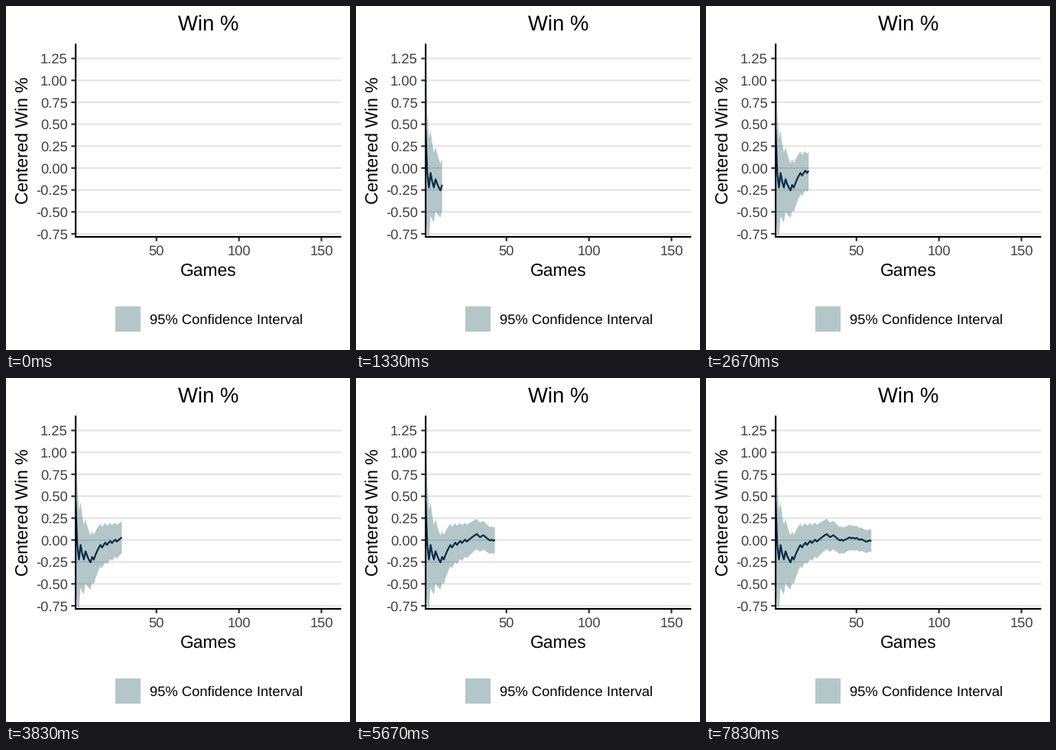
A matplotlib script for the animation above (8 s loop, 450 by 450 pixels).

```python
import numpy as np
import matplotlib.pyplot as plt
from matplotlib.animation import FuncAnimation
from matplotlib.patches import Polygon, Rectangle

plt.rcParams["font.family"] = "Liberation Sans"
plt.rcParams["path.snap"] = False
plt.rcParams["text.hinting"] = "none"

SIZE, DPI = 450, 100
LOOP, TICK = 8000, 20
STEP_MS = LOOP / 48
GAMES_PER_STEP = 161 / 130
LEFT, RIGHT = 91.1, 438.5
PX = 72 / DPI
BASE = 22.92
LINE = 2.2 * PX
TEAL, NAVY, GREY = "#08484A", "#062A48", "#404040"

RESULTS = ("WLLWLLWLLL" "WLWWWWLWWL" "WWLWWLWWWW"
           "WWLLWWLLLL" "WLWWWWLWLW" "LLWLLLWWL")
SEASON_PCT = 90 / 162


def x_px(game):
    return LEFT + (game - 1) * (RIGHT - LEFT) / 161


def y_px(value):
    return 212 - 114.7 * value


# Running win percentage and its 95% interval
games = np.arange(1, len(RESULTS) + 1)
mean = np.cumsum([r == "W" for r in RESULTS]) / games - SEASON_PCT
half = 1.96 * np.sqrt(SEASON_PCT * (1 - SEASON_PCT) / games)
xs, ys = x_px(games), y_px(mean)
upper, lower = y_px(mean + half), y_px(mean - half)
TOP, BOTTOM = upper.min(), lower.max()

fig = plt.figure(figsize=(SIZE / DPI, SIZE / DPI), dpi=DPI, facecolor="white")
ax = fig.add_axes([0, 0, 1, 1])
ax.set_xlim(0, SIZE)
ax.set_ylim(SIZE, 0)
ax.axis("off")


def stroke(x, y, color, z):
    return ax.plot(x, y, color=color, lw=LINE, zorder=z,
                   solid_capstyle="butt", solid_joinstyle="round")[0]


def label(x, y, text, size=BASE, color="black", ha="center", **kw):
    ax.text(x, y, text, fontsize=size * PX, color=color, ha=ha,
            va="baseline", **kw)


small = 0.8 * BASE
for value in np.arange(-0.75, 1.3, 0.25):
    y = y_px(value)
    stroke([LEFT, RIGHT], [y, y], "#E5E5E5", 1)
    stroke([LEFT - 5.7, LEFT], [y, y], "#333333", 5)
    label(80.8, y + 6.6, f"{value:.2f}", small, GREY, "right")

for game in (50, 100, 150):
    x = x_px(game)
    stroke([x, x], [BOTTOM, BOTTOM + 5.7], "#333333", 5)
    label(x, 326.3, str(game), small, GREY)

stroke([LEFT, LEFT], [TOP, BOTTOM + 1.1], "black", 6)
stroke([LEFT - 1.1, RIGHT], [BOTTOM, BOTTOM], "black", 6)

label(264.6, 32, "Win %", 1.2 * BASE)
label(264.8, 352.5, "Games")
label(28.6, 176, "Centered Win %", rotation=90, rotation_mode="anchor")
label(188.3, 416.2, "95% Confidence Interval", small, ha="left")
ax.add_patch(Rectangle((143, 393), 33, 33, fc=TEAL, alpha=0.3, lw=0))

panel = Rectangle((LEFT, TOP), RIGHT - LEFT, BOTTOM - TOP,
                  transform=ax.transData)
ribbon = ax.add_patch(Polygon(np.zeros((3, 2)), fc=TEAL, alpha=0.3, lw=0,
                              zorder=2))
line = stroke([], [], NAVY, 3)
for artist in (ribbon, line):
    artist.set_clip_path(panel)


def draw(tick):
    # A step that begins within this tick is shown for the whole tick
    step = int((tick + 0.75) * TICK / STEP_MS)
    n = int(round(1 + step * GAMES_PER_STEP))
    ribbon.set_visible(n > 1)
    line.set_visible(n > 1)
    edge_x = np.r_[xs[:n], xs[:n][::-1]]
    edge_y = np.r_[upper[:n], lower[:n][::-1]]
    ribbon.set_xy(np.column_stack([edge_x, edge_y]))
    line.set_data(xs[:n], ys[:n])
    return ribbon, line


anim = FuncAnimation(fig, draw, frames=LOOP // TICK, interval=TICK,
                     repeat=True, repeat_delay=0)
plt.show()
```
